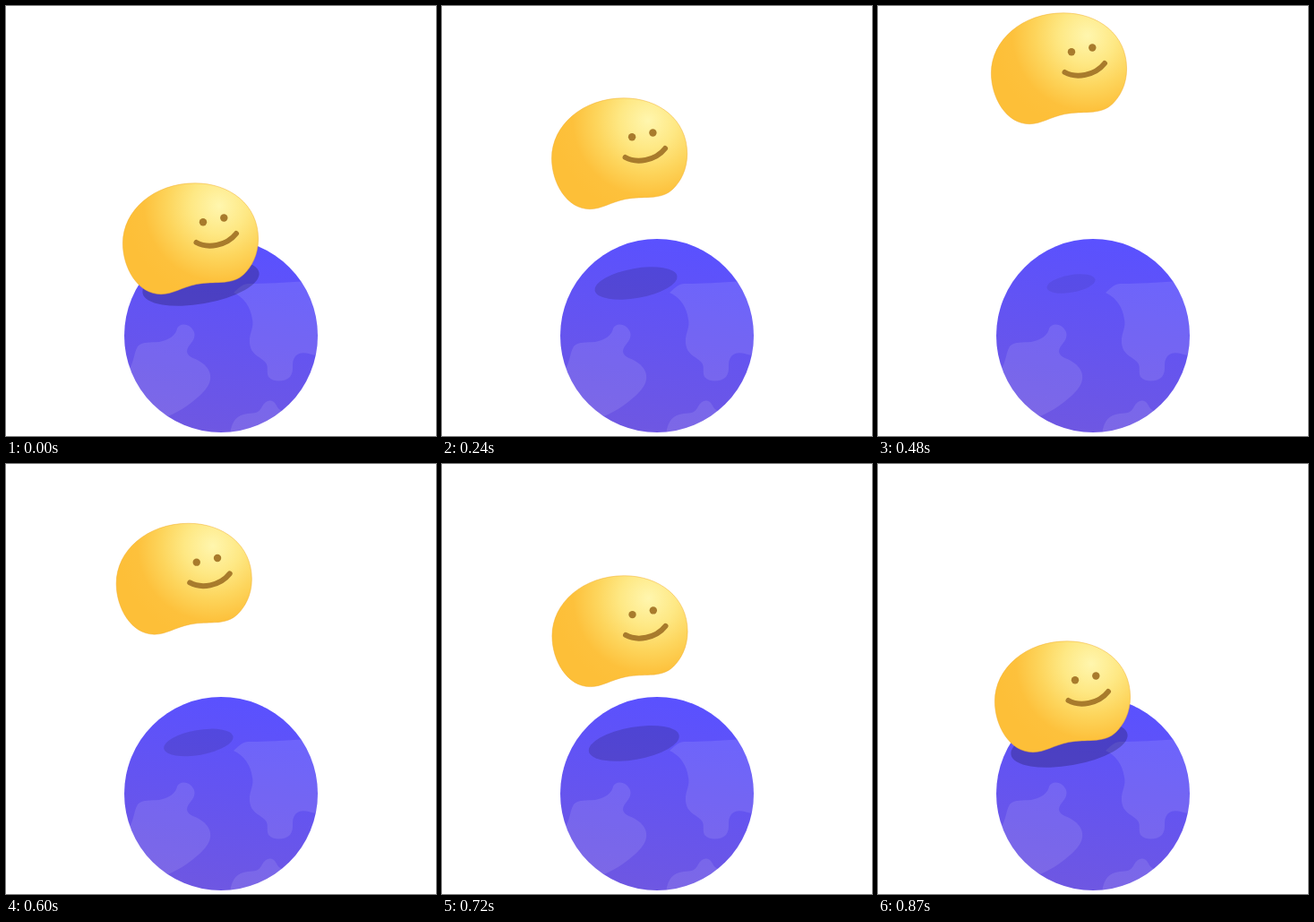
Recreate the animation shown at these times as an HTML page. Size 480 by 480 pixels, loop 0.9 s.

```html
<!DOCTYPE html>
<html lang="en">
<head>
<meta charset="utf-8">
<title>Bouncing blob</title>
<style>
html, body { margin: 0; width: 100%; height: 100%; overflow: hidden; background: #fff; }
svg { display: block; width: 100%; height: 100%; }
</style>
</head>
<body>
<svg viewBox="0 0 480 480">
  <defs>
    <linearGradient id="sea" gradientUnits="userSpaceOnUse" x1="260" y1="262" x2="220" y2="474">
      <stop offset="0" stop-color="#5a51ff"/>
      <stop offset="1" stop-color="#6e57e2"/>
    </linearGradient>
    <radialGradient id="skin" gradientUnits="userSpaceOnUse" cx="238" cy="223" r="105">
      <stop offset="0" stop-color="#fff6ae"/>
      <stop offset=".3" stop-color="#fee884"/>
      <stop offset=".55" stop-color="#fdd55c"/>
      <stop offset=".8" stop-color="#fdc13c"/>
      <stop offset="1" stop-color="#fdbf38"/>
    </radialGradient>
    <clipPath id="globe"><circle cx="240" cy="368" r="108"/></clipPath>
  </defs>

  <g clip-path="url(#globe)">
    <circle cx="240" cy="368" r="109" fill="url(#sea)"/>
    <g fill="#fff" fill-opacity=".1">
      <path d="M254 320C258 317 262 311 270 310C290 310 310 309 335 307H360V394L346 390C338 389 330 384 323 391C317 399 323 406 317 414C311 420 298 420 293 414C290 408 294 402 289 397C283 391 273 389 272 376C271 366 277 360 275 350C273 335 265 325 254 320Z"/>
      <path d="M130 410L138 405C143 396 143 387 147 380C153 374 162 376 171 375C182 373 190 367 191 360C194 353 206 354 210 364C213 374 202 378 202 386C203 393 213 393 221 400C232 410 229 421 221 430C210 442 195 452 181 458L150 470Z"/>
      <path d="M250 480C251 465 257 456 270 455C278 454 282 455 286 447C290 439 298 438 302 446C304 451 308 452 313 453L320 480Z"/>
    </g>
    <ellipse id="shadow" fill="#080418"/>
  </g>

  <g id="blob">
    <path fill="url(#skin)" stroke="#f0ad30" stroke-opacity=".55" stroke-width=".9" d="M211 197.8C250 197.8 281.6 222 281.6 260C281.6 278 274 291 266 299C260 305 252 308 240 308.4C232 309 224 308.5 213 310.5C196 314 186 321.7 173 321.7C147 321.7 130.4 292 130.4 265C130.4 228 165 197.8 211 197.8Z"/>
    <g fill="#a87b2c">
      <circle cx="220" cy="241.2" r="4.2"/>
      <circle cx="243.3" cy="236.5" r="4.2"/>
    </g>
    <path fill="none" stroke="#a87b2c" stroke-width="6" stroke-linecap="round" d="M212.5 264C225 271 246 268 257 254"/>
  </g>
</svg>
<script>
const LOOP = 900, PEAK = 480, LAND = 870, STEP = 30, HEIGHT = 190;
const blob = document.getElementById('blob');
const shadow = document.getElementById('shadow');
const mix = (a, b, k) => a + (b - a) * k;

// Sideways drift along the curved flight path, h = 0 on the ground, 1 at the top
const drift = h => -h * (34.1 - 43.1 * h + 13 * h * h);

function draw(t) {
  const rising = t <= PEAK;
  const h = rising ? t / PEAK : Math.max(0, (LAND - t) / (LAND - PEAK));
  blob.setAttribute('transform', `translate(${drift(h)} ${-HEIGHT * h})`);

  const x = mix(rising ? 217.5 : 213.5, 215.5, h);
  const y = mix(rising ? 309 : 313, 310, h);
  const rx = mix(66, 27.4, h);
  shadow.setAttribute('rx', rx);
  shadow.setAttribute('ry', rx * 0.355);
  shadow.setAttribute('fill-opacity', mix(0.23, 0.07, h));
  shadow.setAttribute('transform', `translate(${x} ${y}) rotate(-10)`);
}

function tick() {
  const t = Math.floor((performance.now() + 1) / STEP) * STEP;
  draw(t % LOOP);
  requestAnimationFrame(tick);
}
tick();
</script>
</body>
</html>
```
